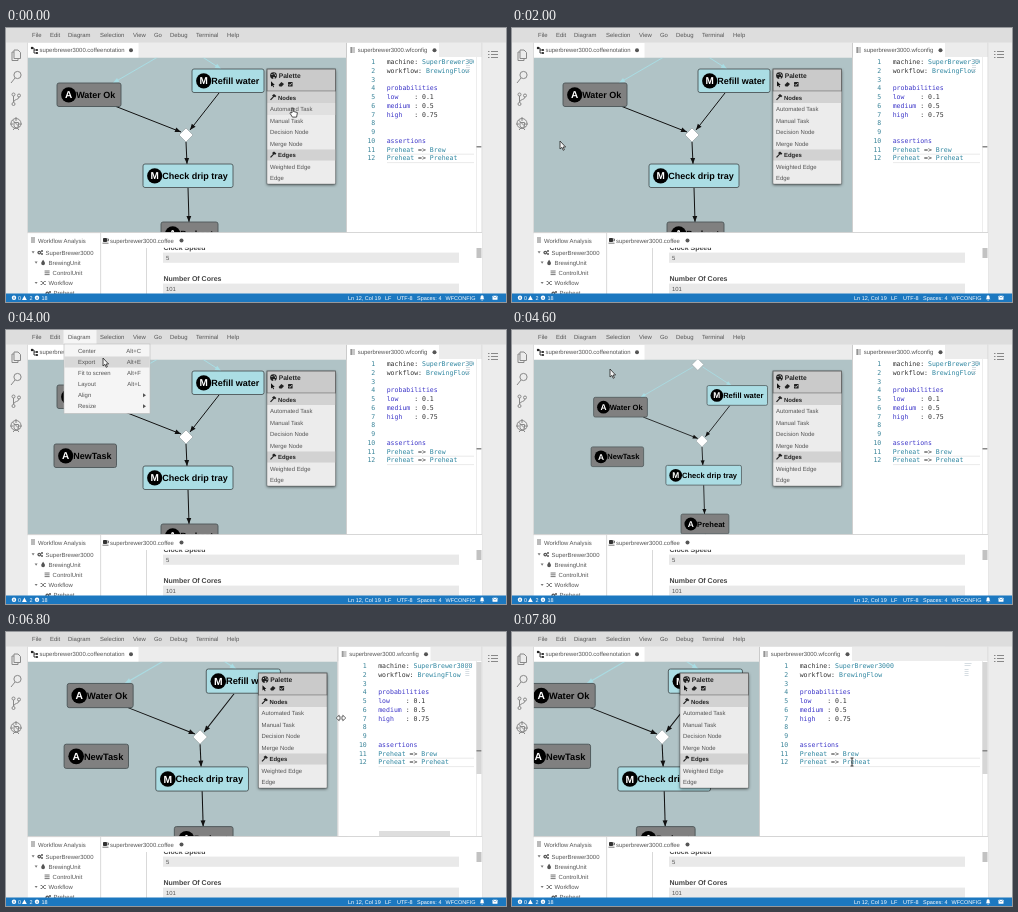
Recreate the animation shown at these times as an HTML page. Size 500 by 274 pixels, loop 8000 ms.

```html
<!DOCTYPE html>
<html lang="en">
<head>
<meta charset="utf-8">
<title>Workflow editor</title>
<style>
html, body { margin: 0; width: 100%; height: 100%; overflow: hidden; background: #ececec; }
svg { display: block; width: 100%; height: 100%; }
text { font: 5.95px "Liberation Sans", Arial, sans-serif; fill: #555; text-rendering: geometricPrecision; white-space: pre; }
.bold { font-weight: bold; fill: #222; }
.code { font: 6.53px "DejaVu Sans Mono", "Liberation Mono", monospace; fill: #333; }
.name { font-size: 9px; font-weight: bold; fill: #000; }
.badge { font-size: 10px; font-weight: bold; fill: #fff; text-anchor: middle; }
.status text { font-size: 5.5px; fill: #fff; }
.icon { fill: none; stroke: #888; stroke-width: 1; }
.small { fill: none; stroke: #555; stroke-width: .8; }
.palette { filter: drop-shadow(0 1px 1.5px rgba(0,0,0,.6)); }
</style>
</head>
<body>
<svg id="stage" viewBox="0 0 500 274" xmlns="http://www.w3.org/2000/svg"></svg>
<script>
const LOOP = 8000, STEP = 200;
const stage = document.getElementById('stage');

const rect = (x, y, w, h, fill, extra = '') =>
  `<rect x="${x}" y="${y}" width="${w}" height="${h}" fill="${fill}" ${extra}/>`;
const text = (x, y, s, cls = '', extra = '') =>
  `<text x="${x}" y="${y}" class="${cls}" ${extra}>${s}</text>`;
const path = (d, extra = 'class="icon"') => `<path d="${d}" ${extra}/>`;
const small = d => path(d, 'class="small"');
const dot = (x, y, r = 2, fill = '#555') => `<circle cx="${x}" cy="${y}" r="${r}" fill="${fill}"/>`;
const solid = (d, fill = '#333') => path(d, `fill="${fill}"`);

// Diagram, placed around the lower decision node
function task(id, kind, x, y, w, label) {
  const fill = kind === 'A' ? '#808080' : '#abdde4';
  return `<g id="${id}" transform="translate(${x} ${y})">` +
    rect(0, 0, w, 23.5, fill, 'rx="2" stroke="#4c5658" stroke-width=".9"') +
    dot(11.7, 11.8, 7.6, '#000') + text(11.7, 15.4, kind, 'badge') +
    text(19.2, 15, label, 'name') + '</g>';
}
const decision = (x, y) =>
  path(`M${x} ${y - 7}l7 7l-7 7l-7-7z`, 'fill="#fff" stroke="#8b9799" stroke-width=".6"');
function edge(x1, y1, x2, y2, color = '#111') {
  const angle = Math.atan2(y2 - y1, x2 - x1) * 180 / Math.PI;
  return path(`M${x1} ${y1}L${x2} ${y2}`, `stroke="${color}" stroke-width="1"`) +
    `<path d="M0 0l-6-2.4v4.8z" fill="${color}" transform="translate(${x2} ${y2}) rotate(${angle})"/>`;
}
const diagram = [
  edge(-57, -127, -43, -127), edge(-4, -116, -5, -98),
  edge(-11, -88, -73, -52, '#a9dde4'), edge(1, -88, 35, -66, '#a9dde4'),
  edge(-70, -28.5, -5, -3), edge(33, -42, 4, -5),
  edge(0, 7, 1, 29), edge(2, 52.5, 3, 87), edge(4, 110.5, 5, 138),
  edge(29, 150, 57, 150),
  decision(-5, -91), decision(0, 0),
  task('push', 'M', -103, -139.5, 46, 'Push'),
  task('checkWater', 'A', -43, -139.5, 79, 'Check Water'),
  task('waterOk', 'A', -129, -52, 64, 'Water Ok'),
  task('refill', 'M', 6, -66, 72, 'Refill water'),
  task('tray', 'M', -43, 29, 90, 'Check drip tray'),
  task('preheat', 'A', -25, 87, 57, 'Preheat'),
  task('brew', 'A', -17, 138, 47, 'Brew'),
  task('drink', 'M', 57, 138, 47, 'Drink'),
  task('newTask', 'A', -132, 7, 62.5, 'NewTask')
].join('');

const hammer = y => solid(`M264 ${y + 2.2}l3-3l-1-1l2-1.6l2.4 2.2l-1.2 1.2l-1-.6l-3.2 3.6z`, '#222');
const palette = `<g class="palette">${rect(261, 41, 68.5, 115, '#ececec', 'rx="1"')}</g>` +
  rect(261, 63.5, 68.5, 11.5, '#d2d2d2') + rect(261, 121.5, 68.5, 11, '#d2d2d2') +
  rect(261, 75, 68.5, 12, '#d4d4d4', 'id="paletteRow"') +
  rect(261, 41, 68.5, 22, '#cacaca', 'stroke="#3c3c3c" stroke-opacity=".6" stroke-width=".8"') +
  rect(261, 41, 68.5, 115, 'none', 'stroke="#3c3c3c" stroke-opacity=".5" stroke-width=".6"') +
  dot(267.5, 47.6, 3.4, '#222') + dot(266, 46.5, .6, '#eee') + dot(268.2, 45.8, .6, '#eee') +
  dot(269.6, 47.2, .6, '#eee') + dot(268, 50, 1, '#cacaca') +
  text(272.7, 50, 'Palette', 'bold', 'style="font-size:6.7px"') +
  solid('M265 53.3v5.2l1.3-1l1 1.8l.8-.4l-.9-1.8h1.6z', '#111') +
  solid('M272.6 57l2.8-3l2.6 2l-2.2 2.6h-2.2z', '#222') +
  rect(282, 54, 4.6, 4.6, '#222', 'rx=".6"') +
  path('M282.8 56.2l1.1 1.2l2-2.2', 'fill="none" stroke="#fff" stroke-width=".7"') +
  hammer(69.3) + hammer(126.8) +
  text(272, 71.8, 'Nodes', 'bold') + text(272, 129.3, 'Edges', 'bold') +
  [[83.2, 'Automated Task'], [94.7, 'Manual Task'], [106.2, 'Decision Node'], [117.7, 'Merge Node'],
   [140.7, 'Weighted Edge'], [152.2, 'Edge']].map(([y, s]) => text(264, y, s)).join('');

// Code editor
const paint = (color, s) => `<tspan fill="${color}">${s}</tspan>`;
const type = s => paint('#2f86a0', s), word = s => paint('#3d36c8', s);
const lines = [
  'machine: ' + type('SuperBrewer3000'), 'workflow: ' + type('BrewingFlow'), '',
  word('probabilities'), word('low') + '    : 0.1', word('medium') + ' : 0.5', word('high') + '   : 0.75',
  '', '', word('assertions'),
  type('Preheat') + ' =&gt; ' + type('Brew'), type('Preheat') + ' =&gt; ' + type('Preheat')
];
const code = lines.map((s, i) => {
  const y = 36 + i * 8.755;
  return text(369.3, y, i + 1, 'code', 'text-anchor="end" style="fill:#3a8499"') + text(380.7, y, s, 'code');
}).join('');
const editor = rect(340, 14.5, 300, 190, '#ececec') + rect(340, 29, 300, 175.5, '#fff') +
  rect(341, 15, 92, 14.5, '#fff') +
  path('M344 20h5M344 22h5M344 24h5M345.3 19v6', 'stroke="#777" stroke-width=".8"') +
  text(351.7, 24.2, 'superbrewer3000.wfconfig') + dot(428.5, 22.2) +
  path('M381 126.2h260M381 134.6h260', 'stroke="#e4e4e4" stroke-width=".8"') + code +
  rect(340, 14.5, .8, 190, '#c4c4c4');
const minimap = [[31, 7], [33, 6], [37, 4], [39, 4], [41, 4], [43, 4]]
  .map(([y, w]) => rect(460, y, w, .7, '#c5cfd6')).join('');
const scrollbars = rect(470.5, 30, 5, 112, '#d6d6d6', 'id="scrollY"') +
  rect(373, 199, 71, 5, '#dedede', 'id="scrollX"') + rect(470.5, 118, 5, 1.5, '#888');

// Surrounding window
const menus = [[26, 'File'], [44, 'Edit'], [62, 'Diagram'], [94, 'Selection'], [127, 'View'],
  [148, 'Go'], [164, 'Debug'], [190, 'Terminal'], [221, 'Help']];
const menuBar = rect(0, 0, 500, 14.5, '#dddddd') +
  rect(57.5, 0, 33, 14.5, '#f5f5f5', 'id="menuTitle"') +
  menus.map(([x, s]) => text(x, 9.3, s)).join('');

const commands = [['Center', 'Alt+C'], ['Export', 'Alt+E'], ['Fit to screen', 'Alt+F'], ['Layout', 'Alt+L'],
  ['Align'], ['Resize']];
const dropdown = '<g id="dropdown">' +
  rect(58, 14, 86, 69.5, '#f5f5f5', 'stroke="#bbb" stroke-width=".6"') +
  rect(58.3, 0, 85.4, 11, '#d8d8d8', 'id="menuRow"') +
  commands.map(([s, key], i) => {
    const y = 23.2 + i * 11;
    return text(72, y, s) + (key ? text(135, y, key, '', 'text-anchor="end"') : solid(`M137 ${y - 4}l3 2l-3 2z`, '#555'));
  }).join('') + '</g>';

const sides = rect(0, 14.5, 21.5, 252, '#ececec') + rect(476, 14.5, 24, 252, '#ececec') +
  rect(21.2, 14.5, .6, 251, '#d2d2d2') + rect(475.6, 14.5, .6, 251, '#d2d2d2') +
  path('M8 22h4l2.5 2.5v6h-6.5zM8 24h-2v8.5h6v-2') +
  '<circle cx="11.5" cy="47" r="3.6" class="icon"/>' + path('M9 50l-4 5') +
  '<g class="icon"><circle cx="7.5" cy="66.5" r="1.5"/><circle cx="13" cy="67.5" r="1.5"/><circle cx="7.5" cy="76" r="1.5"/></g>' +
  path('M7.5 68v6.5M13 69c0 3-5 2-5.5 5') +
  '<circle cx="10" cy="95.5" r="5" class="icon"/>' +
  path('M6.5 92l7 7M8 94.5h4.5v3a2.2 2.2 0 0 1-4.5 0zM4 96h3M13 96h3M10 89v4M7 102l2-2M13 102l-2-2') +
  path('M482 23.5h1.5M485 23.5h7M482 26.5h1.5M485 26.5h7M482 29.5h1.5M485 29.5h7');

const diagramTab = rect(22, 14.5, 319, 15, '#ececec') + rect(22, 15, 110.5, 14.5, '#fff') +
  path('M26 20h2v2h3M28 22v3h3', 'fill="none" stroke="#222" stroke-width=".9"') +
  dot(26, 20, 1.2, '#222') + dot(31, 22, 1.1, '#222') + dot(31, 25, 1.1, '#222') +
  text(33.5, 24.2, 'superbrewer3000.coffeenotation') + dot(125, 22.2);

// Tree icons are drawn around their own centre
const gears = dot(-.8, .3, 1.9) + dot(-.8, .3, .7, '#fff') + dot(1.9, -1.3, 1) + dot(1.9, 1.6, 1);
const drop = solid('M0-2.8c1 1.6 1.9 2.3 1.9 3.500a1.900 1.900 0 0 1-3.800 0c0-1.200.9-1.900 1.900-3.500z', '#555');
const bars = small('M-2.5-1.800h5M-2.5 0h5M-2.5 1.800h5');
const shuffle = small('M-2.5-1.500h1.300l2.400 3h1.500M-2.5 1.500h1.300l2.400-3h1.500');
const tree = [[39.6, 226.5, 'SuperBrewer3000', gears, true], [42.6, 236.8, 'BrewingUnit', drop, true],
  [46.6, 247, 'ControlUnit', bars], [42.6, 257.2, 'Workflow', shuffle, true], [47.6, 267.4, 'Preheat', gears]]
  .map(([x, y, s, icon, open]) =>
    text(x, y, s) + `<g transform="translate(${x - 5.5} ${y - 2.2})">${icon}</g>` +
    (open ? solid(`M${x - 14} ${y - 3.3}h3l-1.5 2.2z`, '#777') : '')).join('');
const field = (y, label, value) => text(157.5, y, label, 'bold', 'style="font-size:7px;fill:#444"') +
  rect(157, y + 2.6, 296, 10.2, '#e9e9e9') + text(160, y + 10, value);
const bottom = rect(21.5, 204.3, 454.5, 62, '#fff') + rect(21.5, 204.3, 454.5, .8, '#c8c8c8') +
  field(222, 'Clock Speed', '5') + field(253, 'Number Of Cores', '101') +
  rect(95, 205, 381, 14.8, '#fff') +
  rect(94.3, 205, .8, 61, '#d0d0d0') + rect(140, 220, .8, 46, '#d0d0d0') +
  rect(470.5, 220, 5, 10, '#c2c2c2') +
  small('M25 210h4M25 212h4M25 214h4') + text(32, 214.5, 'Workflow Analysis') +
  rect(97, 210, 4, 4, '#333', 'rx=".8"') + small('M101 211h1.5v1.8h-1.5M96.5 215.2h6') +
  text(104, 214.5, 'superbrewer3000.coffee') + dot(175.5, 212.5) + tree;

const status = '<g class="status">' + rect(0, 265.5, 500, 8.5, '#1c78c0') +
  dot(8, 269.8, 2.2, '#fff') + path('M7.2 269l1.6 1.6m0-1.6l-1.6 1.6', 'stroke="#1c78c0" stroke-width=".6"') +
  solid('M16 272l2.4-4.4l2.4 4.4z', '#fff') + dot(31, 269.8, 2.2, '#fff') + rect(30.7, 269, .7, 2, '#1c78c0') +
  [[12, '0'], [23.5, '2'], [35.5, '18'], [342, 'Ln 12, Col 19'], [379, 'LF'], [391, 'UTF-8'],
   [411, 'Spaces: 4'], [439.5, 'WFCONFIG']].map(([x, s]) => text(x, 271.7, s)).join('') +
  solid('M473.8 271.3l.8-1v-1.5a1.5 1.5 0 0 1 3 0v1.5l.8 1zM475.5 271.8h1.2v.7h-1.2z', '#fff') +
  rect(486.5, 267.8, 5, 4, '#fff', 'rx=".5"') +
  path('M486.7 268l2.3 2l2.3-2', 'fill="none" stroke="#1c78c0" stroke-width=".5"') + '</g>';

const cursors = '<g id="cursor">' +
  path('M0 0v8l1.9-1.6l1.3 2.9l1.2-.6l-1.3-2.7h2.5z', 'id="arrow" fill="#f4f4f4" stroke="#222" stroke-width=".8"') +
  path('M1 0v5l-1.5-.7l-.6.8l2.5 4h4.2l.8-4.5l-4.1-1.2v-3.4z', 'id="hand" fill="#fff" stroke="#111" stroke-width=".7"') +
  path('M-4.8 0l3-2.8v1.9h3.6v-1.9l3 2.8l-3 2.8v-1.9h-3.6v1.9z', 'id="resize" fill="#fff" stroke="#333" stroke-width=".7"') +
  path('M-1.5-4h3M0-4v8M-1.5 4h3', 'id="beam" fill="none" stroke="#222" stroke-width=".9"') + '</g>';

stage.innerHTML =
  '<defs><clipPath id="editorClip"><rect x="22" y="14.5" width="446" height="190"/></clipPath>' +
  '<clipPath id="diagramClip"><rect x="21.5" y="29.5" width="320" height="175"/></clipPath></defs>' +
  rect(0, 0, 500, 274, '#ececec') +
  `<g clip-path="url(#diagramClip)">${rect(21.5, 29, 320, 176, '#b0c3c6')}<g id="diagram">${diagram}</g></g>` +
  diagramTab + `<g id="palette">${palette}</g>` +
  rect(467, 29, 9, 175.5, '#fff') + rect(433, 14.5, 43, 14.5, '#ececec') +
  `<g clip-path="url(#editorClip)"><g id="editor">${editor}</g></g>` +
  `<g id="minimap">${minimap}</g>` + rect(470, 29, .6, 175, '#e2e2e2') + scrollbars +
  sides + bottom + menuBar + dropdown + status + cursors;

// Steps: time, then values
const viewSteps = [
  [0, 1, 180, 107], [4200, 1, 180, 107], [4400, .97, 182.5, 108], [4600, .84, 190, 111],
  [4800, .66, 191, 111.5], [5000, .58, 190.5, 110], [6000, .58, 190.5, 110],
  [6200, .68, 192, 109], [6400, .91, 196, 106.5], [6600, 1.03, 198.5, 105]
];
const splitSteps = [[0, 340], [6600, 340], [6800, 331.5], [7400, 247]];
const cursorSteps = [
  [0, 285, 80], [800, 285, 80], [1000, 241, 92], [1200, 241, 92], [1400, 190, 98], [2000, 48, 113],
  [2200, 48, 113], [2400, 51, 97], [2600, 51, 97], [2800, 60, 68], [3000, 70, 36], [3200, 74, 6],
  [3400, 74, 6], [3600, 97, 28], [4000, 97, 28], [4200, 98, 39], [4800, 98, 39], [5000, 108, 45],
  [5200, 150, 52], [5600, 295, 73], [5800, 334, 78], [6000, 334, 78], [6200, 339, 85], [6600, 341, 86],
  [6800, 335, 86], [7400, 250, 92], [7600, 298, 112], [7800, 340, 130]
];

function sample(steps, t) {
  const next = steps.findIndex(s => s[0] > t);
  if (next < 0) return steps[steps.length - 1].slice(1);
  const a = steps[next - 1], b = steps[next], p = (t - a[0]) / (b[0] - a[0]);
  return a.slice(1).map((v, i) => v + (b[i + 1] - v) * p);
}
const part = id => document.getElementById(id);
const move = (id, x, y = 0, s = 1) => part(id).setAttribute('transform', `translate(${x} ${y}) scale(${s})`);
const show = (id, on) => { part(id).style.display = on ? '' : 'none'; };
const during = (t, from, to) => t >= from && t < to;

function draw(now) {
  const t = Math.floor(now % LOOP / STEP) * STEP;
  const [zoom, x, y] = sample(viewSteps, t);
  const [split] = sample(splitSteps, t);
  const [cx, cy] = sample(cursorSteps, t);
  const shift = split - 340;

  move('diagram', x + shift * .52, y, zoom);
  move('palette', shift);
  move('editor', shift);
  move('minimap', shift * .08);
  move('cursor', cx, cy);

  show('newTask', t >= 2200);
  show('paletteRow', t < 2000);
  part('paletteRow').setAttribute('fill', t < 600 ? '#e0e0e0' : '#d6d6d6');
  const menuOpen = during(t, 3400, 4400);
  show('dropdown', menuOpen);
  show('menuTitle', during(t, 3200, 4400));
  show('menuRow', during(t, 3600, 4400));
  move('menuRow', 0, t < 4200 ? 26.5 : 37.5);
  show('scrollY', t >= 6200);
  show('scrollX', during(t, 6200, 7200));

  const kind = t < 1000 ? 'hand' : t < 6200 ? 'arrow' : t < 7600 ? 'resize' : 'beam';
  for (const id of ['arrow', 'hand', 'resize', 'beam']) show(id, id === kind);
}

const start = performance.now();
function tick() {
  draw(performance.now() - start);
  requestAnimationFrame(tick);
}
tick();
</script>
</body>
</html>
```
